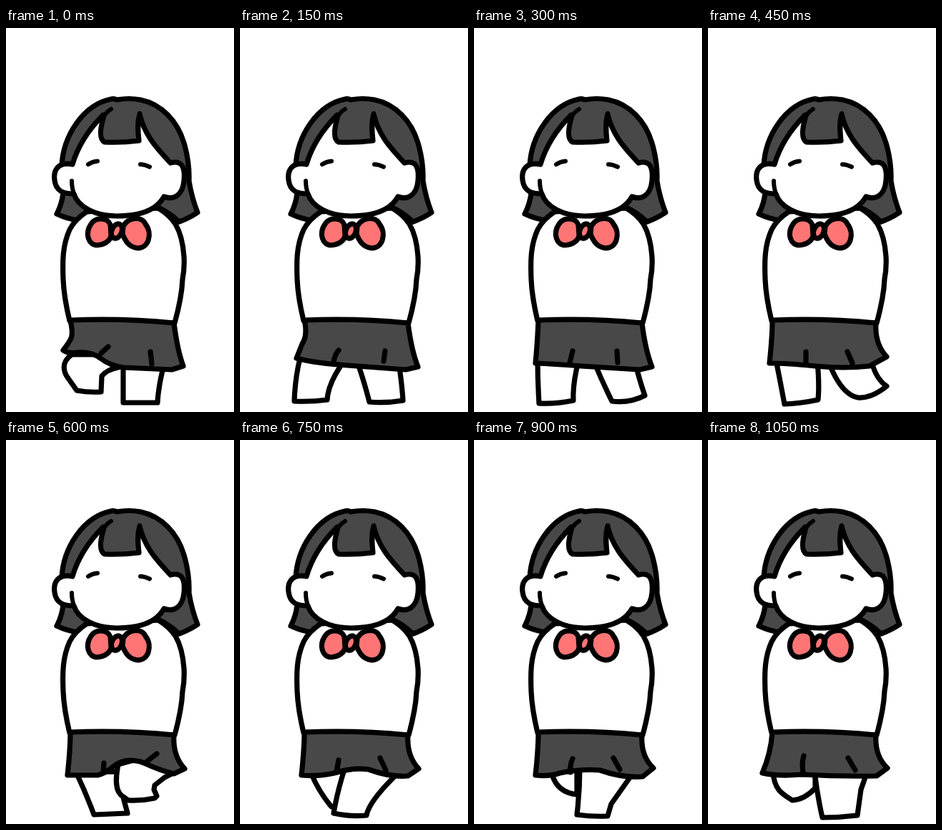
Recreate the animation shown at these times as an HTML page without scripts. Size 319 by 535 pixels, loop 1200 ms.

```html
<!DOCTYPE html>
<html lang="en">
<head>
<meta charset="utf-8">
<title>Walking girl</title>
<style>
  html, body { margin: 0; width: 100%; height: 100%; overflow: hidden; background: #fff; }
  svg { display: block; width: 100%; height: 100%; }
  path, ellipse { stroke: #000; stroke-width: 7.2; stroke-linecap: round; stroke-linejoin: round; fill: none; }
  .dark { fill: #484848; }
  .white { fill: #fff; }
  .red { fill: #ff7575; }
  .fine { stroke-width: 6; }

  /* eight poses, each shown for one step of the cycle */
  .pose { visibility: hidden; animation: show 1.2s step-end infinite; animation-delay: calc((var(--i) - 8) * 150ms); }
  @keyframes show {
    0% { visibility: visible; }
    12.5%, 100% { visibility: hidden; }
  }
</style>
</head>
<body>
<svg viewBox="0 0 319 535">
  <!-- hair -->
  <path class="dark" d="M78 192C80 150 108 107 147 99Q151 98 155 100Q172 97 188 100C218 106 240 130 249 160Q257 187 256 213Q260 237 268 257Q256 265 242 270Q230 258 213 250L112 256Q107 263 101 268Q86 266 71 259Q78 246 80 230Z"/>

  <!-- body -->
  <path class="white" d="M113 256Q96 267 89 281C79 303 79 325 80 350Q81 375 89 408L236 411Q246 375 247 350Q250 335 249 318Q247 290 237 273Q228 260 213 251Z"/>

  <!-- face and ears -->
  <path class="white" d="M136 121C117 140 101 163 93 190C73 186 66 198 68 212C70 228 81 231 95 231C101 250 126 262 155 262C190 262 211 253 221 235C235 240 247 233 249 213C251 192 245 184 230 188C216 172 194 152 187 120C183 134 185 146 186 157Q162 160 138 159C130 155 132 140 136 126Z"/>
  <path class="fine" d="M147 113Q138 118 134 130M187 119V124M92 213Q92 224 96 233"/>
  <path class="fine" d="M115 190Q121 186 128 185.500M188 190Q194 190 201 193.500"/>

  <!-- bow -->
  <path class="red" d="M146 274C142 264 126 263 119 273C110 286 115 303 128 302.500C139 302 147 295 147 288Z"/>
  <path class="red" d="M164 276C172 263 190 262 195 273C206 287 199 308 183 306.500C172 305 167 297 163 287Z"/>
  <ellipse class="red" cx="155" cy="283" rx="7" ry="10.500" transform="rotate(22 155 283)"/>

  <!-- left foot forward, lifted -->
  <g class="pose" style="--i:0">
    <path class="white" d="M92 455C76 466 81 480 87 488L99 505Q116 508 133 507L134 485Q141 476 157 473V455Z"/>
    <path class="white" d="M164 465V522L212 522Q213 502 219 477V460Z"/>
    <path class="dark" d="M90 407C95 430 93 432 80 449Q87 454 100 452Q120 451 132 460Q146 471 165 473L232 476L248 471Q240 450 235 411Q165 404 90 407Z"/>
    <path d="M143 444L133 453M202 451L204 468"/>
  </g>

  <!-- left foot down -->
  <g class="pose" style="--i:1">
    <path class="white" d="M84 460Q77 488 76 520Q100 521 122 518Q123 498 140 472V455Z"/>
    <path class="white" d="M164 465Q173 490 181 521Q204 523 228 519Q227 500 222 465Z"/>
    <path class="dark" d="M90 407Q95 428 87 440L79 460Q104 467 150 470L232 476L249 472Q240 450 235 411Q165 404 90 407Z"/>
    <path d="M138 449Q133 454 131 465M203 450L201 464"/>
  </g>

  <!-- pushing off with the right foot -->
  <g class="pose" style="--i:2">
    <path class="white" d="M89 460Q89 490 91 523Q115 524 139 519Q138 495 146 465Z"/>
    <path class="white" d="M168 465Q179 492 193 520Q218 523 239 512Q232 492 225 465Z"/>
    <path class="dark" d="M90 407Q89 435 86 467Q110 468 150 471L232 476L249 472Q240 450 235 411Q165 404 90 407Z"/>
    <path d="M138 450L134 466M200 450L201 466"/>
  </g>

  <!-- right foot trailing -->
  <g class="pose" style="--i:3">
    <path class="white" d="M95 462Q101 492 107 524Q130 523 154 518Q156 496 153 465Z"/>
    <path class="white" d="M169 466C180 494 193 512 210 515Q229 516 250 499Q235 489 229 465Z"/>
    <path class="dark" d="M90 407Q90 430 86 467Q110 467 150 471Q190 475 226 471L250 458Q233 440 235 411Q165 404 90 407Z"/>
    <path d="M137 451V466M195 451L202 467"/>
  </g>

  <!-- right foot passing -->
  <g class="pose" style="--i:4">
    <path class="white" d="M98 463Q112 492 123 522L170 520L164 498V462Z"/>
    <path class="white" d="M157 452C153 472 152 490 164 497L171 502Q190 503 208 499L211 496L207 487L208 481L222 470L232 465L200 440Z"/>
    <path class="dark" d="M90 407Q90 430 86 467H128Q140 464 150 455Q168 441 193 450Q217 461 235 465L250 458Q233 440 235 411Q165 404 90 407Z"/>
    <path d="M137 450L136 463M211 437L197 448"/>
  </g>

  <!-- right foot down -->
  <g class="pose" style="--i:5">
    <path class="white" d="M99 463Q110 490 128 511L155 508V462Z"/>
    <path class="white" d="M147 456Q136 490 131 520Q153 525 177 523Q180 505 215 470V455Z"/>
    <path class="dark" d="M90 407Q90 430 86 467Q112 469 132 464Q158 456 180 459Q210 470 235 468L250 458Q233 440 235 411Q165 404 90 407Z"/>
    <path d="M138 446L135 463M196 443L204 460"/>
  </g>

  <!-- left foot trailing -->
  <g class="pose" style="--i:6">
    <path class="white" d="M109 465Q116 491 144 494V460Z"/>
    <path class="white" d="M148 455Q148 490 144 522Q165 525 187 524L192 507L219 469V458Z"/>
    <path class="dark" d="M90 407Q90 430 86 467Q106 469 120 464Q148 458 176 460Q207 471 236 469L251 457Q233 440 235 411Q165 404 90 407Z"/>
    <path d="M138 444Q134 452 135 463M195 443L204 459"/>
  </g>

  <!-- left foot passing -->
  <g class="pose" style="--i:7">
    <path class="white" d="M91 463C93 488 104 493 118 502Q135 501 150 485V462Z"/>
    <path class="white" d="M149 462Q153 496 160 526Q184 526 209 523L214 487L220 470V460Z"/>
    <path class="dark" d="M90 407Q88 436 76 464Q100 469 130 466Q185 469 236 468L251 457Q233 440 235 411Q165 404 90 407Z"/>
    <path d="M134 440Q131 450 133 463M196 443L206 460"/>
  </g>
</svg>
</body>
</html>
```
